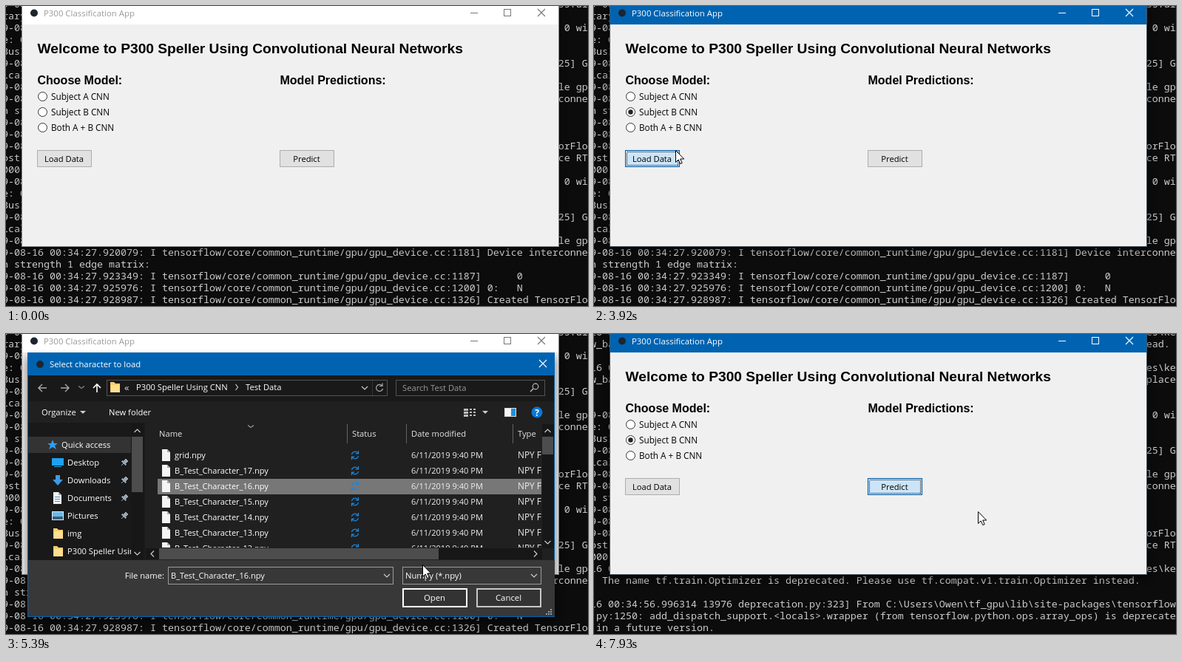
These frames come from a looping animation (787x406 px, 8000 ms). An HTML page:

```html
<!DOCTYPE html>
<html lang="en">
<head>
<meta charset="utf-8">
<title>P300 Classification App</title>
<style>
html, body { margin: 0; width: 100%; height: 100%; overflow: hidden; background: #0c0c0c; }
svg { display: block; width: 787px; height: 406px; }
text { font-family: "Open Sans", "Noto Sans", sans-serif; white-space: pre; }
.head text { font-family: "Liberation Sans", Arial, sans-serif; font-weight: bold; }
.console text { font-family: "Noto Sans Mono", "DejaVu Sans Mono", monospace; }
rect { shape-rendering: crispEdges; }
.shadow { filter: blur(6px); shape-rendering: auto; }
</style>
</head>
<body>
<svg id="stage" viewBox="0 0 787 406" xmlns="http://www.w3.org/2000/svg">
  <defs>
    <clipPath id="sideClip"><rect x="30" y="120" width="139" height="185"/></clipPath>
    <clipPath id="listClip"><rect x="188" y="120" width="536" height="169"/></clipPath>
  </defs>
  <g id="console" class="console"></g>
  <g id="windows"></g>
</svg>
<script>
const LOOP = 8000;
const BLUE = '#0063b1';

// Each step holds until the next; unset properties carry over.
const STEPS = [
  [0, { x: -40, y: 0, scroll: 0, active: false, radio: -1, focus: '', press: '',
        alpha: 0, scale: 1, file: '', marked: false }],
  [710, { x: 150, y: 261 }],
  [850, { x: 142, y: 228 }],
  [990, { x: 128, y: 190 }],
  [1130, { x: 114, y: 163 }],
  [1280, { x: 106, y: 144 }],
  [1420, { x: 101, y: 130 }],
  [1560, { x: 102, y: 137 }],
  [1700, { x: 105, y: 143 }],
  [2110, { active: true, focus: 'radio' }],
  [2260, { radio: 1 }],
  [3250, { x: 116, y: 154 }],
  [3380, { x: 115, y: 176 }],
  [3520, { x: 111, y: 193 }],
  [3650, { x: 110, y: 195 }],
  [3790, { press: 'load', focus: 'load' }],
  [3930, { press: '', active: false }],
  [4070, { alpha: .89, scale: .994 }],
  [4190, { alpha: 1, scale: 1 }],
  [4340, { x: 125, y: 196 }],
  [4470, { x: 190, y: 200 }],
  [4600, { x: 255, y: 205 }],
  [4740, { x: 283, y: 207 }],
  [4870, { file: 'B_Test_Character_16.npy' }],
  [5000, { x: 340, y: 222 }],
  [5140, { x: 470, y: 276 }],
  [5270, { x: 545, y: 305 }],
  [5390, { x: 563, y: 312 }],
  [5510, { x: 576, y: 336 }],
  [5650, { x: 583, y: 350 }],
  [5790, { press: 'open', marked: true }],
  [5930, { press: '' }],
  [6080, { active: true, alpha: .27, scale: .966 }],
  [6200, { alpha: 0 }],
  [6480, { x: 579, y: 345 }],
  [6630, { x: 540, y: 310 }],
  [6780, { x: 480, y: 255 }],
  [6930, { x: 436, y: 217 }],
  [7090, { x: 427, y: 211 }],
  [7270, { press: 'predict', focus: 'predict', scroll: 6 }],
  [7390, { scroll: 15 }],
  [7530, { x: 434, y: 213, scroll: 28 }],
  [7660, { x: 462, y: 222 }],
  [7800, { x: 500, y: 235, scroll: 31 }],
  [7930, { x: 519, y: 240, scroll: 34 }],
];

// Drawing helpers
const text = (x, y, s, fill = '#fff', size = 11.2, extra = '') =>
  `<text x="${x}" y="${y}" fill="${fill}" font-size="${size}" ${extra}>${s}</text>`;
const rect = (x, y, w, h, fill) =>
  `<rect x="${x}" y="${y}" width="${w}" height="${h}" fill="${fill}"/>`;
const frame = (x, y, w, h, fill, stroke, extra = '') =>
  `<rect x="${x + .5}" y="${y + .5}" width="${w - 1}" height="${h - 1}" fill="${fill}" stroke="${stroke}" ${extra}/>`;
const thickFrame = (x, y, w, h, fill, stroke) =>
  `<rect x="${x + 1}" y="${y + 1}" width="${w - 2}" height="${h - 2}" fill="${fill}" stroke="${stroke}" stroke-width="2"/>`;
const line = (d, stroke = '#fff', width = 1) =>
  `<path d="${d}" fill="none" stroke="${stroke}" stroke-width="${width}"/>`;
const shape = (d, fill) => `<path d="${d}" fill="${fill}"/>`;
const dot = (x, y, r, fill) => `<circle cx="${x}" cy="${y}" r="${r}" fill="${fill}"/>`;
const dotted = (x, y, w, h) => frame(x, y, w, h, 'none', '#000', 'stroke-dasharray="1 1"');
const shadow = (x, y, w, h, a) =>
  `<rect class="shadow" x="${x}" y="${y}" width="${w}" height="${h}" opacity="${a}"/>`;
const chevron = (x, y, dx, dy, c = '#ccc') => dx
  ? line(`M${x - dx} ${y - 4}l${2 * dx} 4l${-2 * dx} 4`, c, 1.2)
  : line(`M${x - 4} ${y - dy}l4 ${2 * dy}l4 ${-2 * dy}`, c, 1.2);
const triangle = (x, y) => shape(`M${x - 4} ${y - 2}h8l-4 4z`, '#ccc');
const cross = (x, y, c) => line(`M${x - 5} ${y - 5}l10 10m0 -10l-10 10`, c, 1.1);
const inside = (s, x, y, w, h) => s.x >= x && s.x < x + w && s.y >= y && s.y < y + h;

// Console log
const info = (ms, body) => `9-08-16 00:34:27.${ms}: I tensorflow/${body}`;
const device = (ms, body) => info(ms, 'core/common_runtime/gpu/gpu_device.cc:' + body);
const gpuBlock = [
  device(904211, '1640] Found device 0 with properties:'),
  'e: GeForce RTX 2070 major: 7 minor: 5 memoryClockRate(GHz): 1.62',
  'BusID: 0000:01:00.0',
  info(912846, 'stream_executor/platform/default/dlopen_checker_stub.cc:25] GPU libraries are s'),
  'ically linked, skip dlopen check.',
  device(917530, '1763] Adding visible gpu devices: 0'),
  device(920079, '1181] Device interconnect StreamExecutor '),
  'h strength 1 edge matrix:',
  device(923349, '1187]      0'),
  device(925976, '1200] 0:   N'),
  device(928987, '1326] Created TensorFlow device (/job:loc'),
  'ost/replica:0/task:0/device:GPU:0 with 6377 MB memory) -> physical GPU (device: 0, name: GeForce RTX 2070, pci bus id: 0',
  '000:01:00.0, compute capability: 7.5)',
];
const warn = (ms, module, path) =>
  `16 00:34:56.${ms} 13976 ${module}] From C:\\Users\\Owen\\tf_gpu\\lib\\site-packages\\${path}`;
const renamed = (ms, lineNo, name) => [
  warn(ms, 'deprecation_wrapper.py:119', 'keras\\backend\\tensor'),
  `w_backend.py:${lineNo}: The name tf.${name} is deprecated. Please use tf.compat.v1.${name} instead.`,
  '',
];
const LOG = [
  info(896034, 'stream_executor/platform/default/dso_loader.cc:42] Successfully opened dynamic '),
  'rary nvcuda.dll',
  ...gpuBlock, ...gpuBlock,
  ...renamed(638247, 517, 'placeholder'),
  ...renamed(641266, 4138, 'random_uniform'),
  ...renamed(668190, 1834, 'is_finite'),
  ...renamed(684148, 133, 'placeholder_with_default'), '',
  ...gpuBlock,
  warn(948441, 'deprecation_wrapper.py:119', 'keras\\optimizers.py:'),
  ': The name tf.train.Optimizer is deprecated. Please use tf.compat.v1.train.Optimizer instead.',
  '',
  warn(996314, 'deprecation.py:323', 'tensorflow\\python\\ops\\math_grad'),
  '.py:1250: add_dispatch_support.&lt;locals>.wrapper (from tensorflow.python.ops.array_ops) is deprecated and will be r',
  ' in a future version.',
];

function drawApp(s) {
  const free = !s.alpha;
  const ink = s.active ? '#fff' : '#999';
  const glyph = s.active ? '#fff' : '#777';
  let out = shadow(20, -10, 729, 339, s.active ? .6 : .3)
    + rect(22, -2, 725, 327, '#f0f0f0')
    + rect(22, 0, 725, 25, s.active ? BLUE : '#fff')
    + frame(21, -2, 727, 328, 'none', s.active ? '#46535e' : '#8a8a8a')
    + dot(38, 9.5, 5, '#1c2630')
    + text(51, 14, 'P300 Classification App', ink, 11.4)
    + rect(628, 9, 10, 1, glyph) + frame(673, 4, 10, 10, 'none', glyph) + cross(724, 9, glyph)
    + '<g class="head">'
    + text(42.5, 64, 'Welcome to P300 Speller Using Convolutional Neural Networks', '#000', 19.2)
    + text(42.5, 106, 'Choose Model:', '#000', 16)
    + text(370.5, 106, 'Model Predictions:', '#000', 16) + '</g>';

  ['Subject A CNN', 'Subject B CNN', 'Both A + B CNN'].forEach((label, i) => {
    const y = 122.5 + 21 * i;
    const hover = free && inside(s, 42, y - 10.5, 108, 21);
    out += `<circle cx="49.5" cy="${y}" r="6" fill="#fff" stroke="${hover ? '#0078d7' : '#333'}"/>`;
    if (s.radio === i) out += dot(49.5, y, 3.2, '#222');
    out += text(61, y + 4.5, label, '#000', 11.75);
  });
  if (s.focus === 'radio') out += dotted(60, 135, 80, 17);

  [['load', 42, 'Load Data'], ['predict', 370, 'Predict']].forEach(([id, x, label]) => {
    const [fill, edge] = s.press === id ? ['#cce4f7', '#005499']
      : free && inside(s, x, 195, 74, 23) ? ['#e5f1fb', '#0078d7'] : ['#e1e1e1', '#adadad'];
    out += frame(x, 195, 74, 23, fill, edge)
      + text(x + 36.5, 211, label, '#000', 11.2, 'text-anchor="middle"');
    if (s.focus === id) out += dotted(x + 2, 197, 70, 19);
  });
  return out;
}

const folder = (x, y) => shape(`M${x} ${y}h5l2 2h6v12h-13z`, '#f5cf6b') + rect(x + 1, y + 4, 12, 10, '#ffe08f');
const page = (x, y) => shape(`M${x} ${y}h7l4 4v12h-11z`, '#f4f4f4') + shape(`M${x + 7} ${y}v4h4z`, '#aaa');
const pin = y => `<g transform="translate(160 ${y}) rotate(45)">` + rect(-2.5, -5, 5, 5, '#9aa7b2')
  + rect(-4, 0, 8, 1.5, '#9aa7b2') + rect(-.5, 1, 1, 5, '#9aa7b2') + '</g>';
const sync = y => [0, 180].map(a => `<g transform="translate(472 ${y}) rotate(${a})">`
  + line('M-4.5 -1A4.6 4.6 0 0 1 4 -2.5M4.5 -6v3.8h-3.8', '#1a86dc', 1.3) + '</g>').join('');

const PLACES = [
  ['Desktop', y => rect(62, y - 6, 16, 10, '#1ea0f0') + rect(65, y + 5, 10, 1, '#1ea0f0')],
  ['Downloads', y => shape(`M67 ${y - 7}h6v6h4l-7 8l-7 -8h4z`, '#3b9be8')],
  ['Documents', y => page(64, y - 8) + line(`M66 ${y - 1.5}h7m-7 3h7m-7 3h7`, '#4d8fc4')],
  ['Pictures', y => rect(62, y - 6, 16, 12, '#e8eef2') + rect(63, y - 5, 14, 6, '#6bb8e8') + rect(63, y + 1, 14, 4, '#35607d')],
  ['img', y => folder(64, y - 7)],
  ['P300 Speller Using CNN', y => folder(64, y - 7)],
];

function drawSidebar(s) {
  let out = '<g clip-path="url(#sideClip)">' + rect(30, 139, 139, 22, s.file ? '#333' : '#3c3c3c');
  if (s.x < 187) out += chevron(42, 150, 0, 2);
  out += shape('M63 143l2 5h5l-4 3l2 5l-5 -3l-5 3l2 -5l-4 -3h5z', '#2f9df0') + text(75, 154, 'Quick access');
  PLACES.forEach(([name, icon], i) => {
    const y = 174 + 24 * i;
    if (inside(s, 30, y - 12, 139, 24)) out += rect(30, y - 11, 139, 23, '#444');
    out += icon(y) + text(83, y + 4, name);
    if (i < 4) out += pin(y);
  });
  return out + '</g>' + rect(170, 122, 16, 183, '#171717') + rect(170, 139, 15, 75, '#4d4d4d')
    + chevron(177.5, 131, 0, -2) + chevron(177.5, 297, 0, 2);
}

function drawList(s) {
  let out = '<g clip-path="url(#listClip)">';
  [['Name', 207], ['Status', 468], ['Date modified', 548], ['Type', 692]].forEach(([name, x], i) => {
    out += text(x, 139, name, '#e4e4e4');
    if (i) out += rect(x - 7, 122, 1, 26, '#636363');
  });
  out += chevron(331, 125, 0, 1.5, '#999');
  for (let i = 0; i < 7; i++) {
    const y = 164 + 21 * i;
    const name = i ? `B_Test_Character_${18 - i}.npy` : 'grid.npy';
    const hover = inside(s, 205, y - 10, 519, 21) && s.y < 289;
    if (name === s.file && !s.marked) out += rect(205, y - 10, 520, 21, '#777');
    else if (hover) out += rect(205, y - 10, 520, 21, '#4d4d4d');
    out += page(211, y - 8) + text(228, y + 4, name, '#fff', 11) + sync(y)
      + text(548, y + 4, '6/11/2019 9:40 PM', '#eee', 11.1) + text(692, y + 4, 'NPY File', '#eee', 11.8);
  }
  return out + '</g>'
    + rect(725, 122, 16, 168, '#171717') + rect(725, 139, 15, 24, '#4d4d4d')
    + chevron(732.5, 131, 0, -2) + chevron(732.5, 282, 0, 2)
    + rect(189, 290, 536, 15, '#171717') + rect(207, 290, 378, 15, '#4d4d4d')
    + chevron(198, 297.5, -2, 0) + chevron(716, 297.5, 2, 0);
}

function drawToolbar() {
  return line('M55 73h-11m5 -5l-5 5l5 5', '#aaa', 1.4) + line('M74 73h11m-5 -5l5 5l-5 5', '#aaa', 1.4)
    + chevron(102, 72, 0, 1.5, '#888') + line('M123 79v-11m-5 5l5 -5l5 5', '#fff', 1.6)
    + frame(136, 62, 380, 22, '#191919', '#535353') + folder(141, 65)
    + text(160, 77, '«', '#ddd', 13) + text(176, 76, 'P300 Speller Using CNN') + chevron(312, 72, 1.5, 0)
    + text(324, 76, 'Test Data') + chevron(485, 73, 0, 2) + rect(495, 63, 1, 20, '#333')
    + line('M508.5 70A4.5 4.5 0 1 0 509.5 74M509 66.5v4h-4', '#aaa', 1.2)
    + frame(527, 62, 202, 22, '#191919', '#535353') + text(536, 77, 'Search Test Data', '#999')
    + '<circle cx="716" cy="71" r="3.8" fill="none" stroke="#bbb" stroke-width="1.2"/>' + line('M713 74l-4 4', '#bbb', 1.4)
    + text(48, 110, 'Organize') + triangle(104, 106) + text(139, 110, 'New folder')
    + [101, 105, 109].map(y => rect(619, y, 6, 3, '#bbb') + rect(627, y, 3, 2, '#bbb') + rect(632, y, 3, 2, '#bbb')).join('')
    + triangle(648, 106) + frame(674, 100, 16, 12, '#f4f4f4', '#ddd') + rect(683, 101, 6, 10, '#1e90e0')
    + dot(718, 106, 7.5, '#0a78d4') + text(718, 110.5, '?', '#fff', 12, 'text-anchor="middle" font-weight="bold"');
}

function drawFooter(s) {
  const hover = inside(s, 536, 344, 88, 26);
  const openFill = s.press === 'open' ? '#777' : hover ? '#666' : '#333';
  return rect(30, 306, 712, 76, '#383838')
    + text(214, 331, 'File name:', '#fff', 11.2, 'text-anchor="end"')
    + frame(219, 315, 305, 24, '#383838', s.file ? '#9b9b9b' : '#fff')
    + (s.marked ? rect(222, 319, 129, 16, '#0078d7') : '')
    + (s.file ? text(223, 331, s.file, '#fff', 11) : rect(223, 319, 1, 16, '#fff'))
    + chevron(515, 327, 0, 2)
    + frame(536, 315, 188, 24, '#383838', '#9b9b9b') + text(540, 331, 'Numpy (*.npy)') + chevron(714, 327, 0, 2)
    + thickFrame(536, 344, 88, 26, openFill, '#fff')
    + text(579.5, 361, 'Open', '#fff', 11.4, 'text-anchor="middle"')
    + thickFrame(636, 344, 88, 26, '#333', '#c8c8c8')
    + text(679.5, 361, 'Cancel', '#fff', 11.4, 'text-anchor="middle"')
    + [0, 1, 2].map(i => [...Array(i + 1).keys()].map(j => rect(736 - 3 * j, 372 + 3 * i, 2, 2, '#999')).join('')).join('');
}

function drawDialog(s) {
  if (!s.alpha) return '';
  return `<g opacity="${s.alpha}" transform="translate(385.5 204) scale(${s.scale}) translate(-385.5 -204)">`
    + shadow(27, 32, 717, 359, .4)
    + rect(29, 25, 713, 358, BLUE) + rect(30, 56, 711, 36, '#191919') + rect(30, 91, 711, 215, '#202020')
    + rect(30, 120, 158, 186, '#191919')
    + dot(46, 41, 5, '#1c2630') + text(59, 45, 'Select character to load', '#fff', 11.3) + cross(726, 40, '#fff')
    + drawToolbar() + drawSidebar(s) + drawList(s) + drawFooter(s) + '</g>';
}

const drawCursor = s => `<path transform="translate(${s.x} ${s.y})" fill="#fff" stroke="#000"
  d="M.5 .5V16.5L4.2 13L6.8 18.6L9.2 17.5L6.7 12H11.7Z"/>`;

const logLayer = document.getElementById('console');
const windows = document.getElementById('windows');
logLayer.innerHTML = LOG.map((s, i) => text(-5, 2 + 16 * i, s, '#ccc', 13.333)).join('');

let state = {};
const STATES = STEPS.map(([, change]) => (state = { ...state, ...change }));
const start = performance.now();
let shown = -1;

function tick() {
  const time = (performance.now() - start) % LOOP;
  const index = STEPS.filter(([at]) => at <= time).length - 1;
  if (index !== shown) {
    shown = index;
    const s = STATES[index];
    logLayer.setAttribute('transform', `translate(0 ${-16 * s.scroll})`);
    windows.innerHTML = drawApp(s) + drawDialog(s) + drawCursor(s);
  }
  requestAnimationFrame(tick);
}
tick();
</script>
</body>
</html>
```
